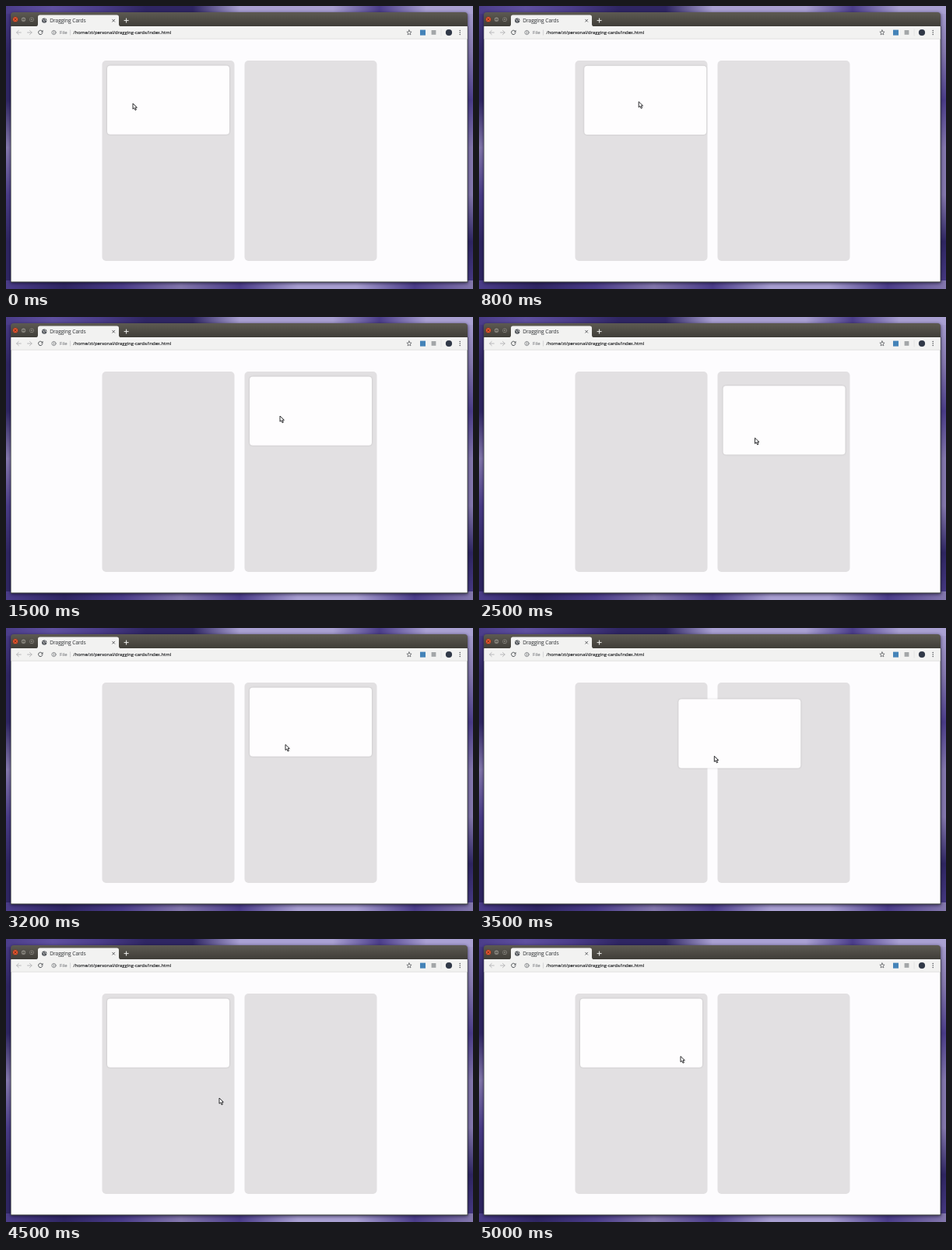
Write an HTML page that moves like this. It is 600 px wide and 363 px high and loops after 5.1 s.

```html
<!DOCTYPE html>
<html lang="en">
<head>
<meta charset="utf-8">
<title>Dragging Cards</title>
<style>
  html, body { margin: 0; width: 100%; height: 100%; overflow: hidden; background: #41357a; }
  svg { display: block; width: 600px; height: 363px; }
  text { font-family: "Open Sans", "Noto Sans", sans-serif; }
  #card { filter: drop-shadow(0 .3px 1px rgba(0, 0, 0, .16)); }
  .window { filter: drop-shadow(0 1px 2px rgba(10, 5, 30, .7)); }
  .line { fill: none; stroke-linecap: round; stroke-linejoin: round; }
</style>
</head>
<body>
<svg viewBox="0 0 600 363">
  <defs id="defs">
    <linearGradient id="bar" x2="0" y2="1">
      <stop offset="0" stop-color="#5d5a52"/>
      <stop offset="1" stop-color="#3e3c37"/>
    </linearGradient>
  </defs>

  <!-- wallpaper -->
  <rect width="10" height="363" fill="url(#left)"/>
  <rect x="590" width="10" height="363" fill="url(#right)"/>
  <rect width="600" height="10" fill="url(#top)"/>
  <rect y="352" width="600" height="11" fill="url(#bottom)"/>

  <!-- browser window -->
  <g class="window">
    <path fill="url(#bar)" d="M6 27V12q0-4 4-4h579q4 0 4 4v15z"/>
    <path fill="#3a403d" d="M6 26h587.4v328.6H6z"/>
  </g>
  <path fill="#fdfcfe" d="M6.6 26h586v327.4h-586z"/>
  <path fill="#f2f2f1" d="M6.6 26.2h586V42h-586zM38 26.3q3 0 3-3V14q0-2.6 2.6-2.6h98.8q2.6 0 2.6 2.6v9.3q0 3 3 3z"/>
  <path fill="#d8d7d7" d="M6.6 41.8h586v.6h-586z"/>

  <circle cx="12" cy="17.2" r="3.6" fill="#e4552f" stroke="#35332f" stroke-width=".6"/>
  <path class="line" stroke="#6b2512" stroke-width=".8" d="M10.7 15.9l2.6 2.6m0-2.6l-2.6 2.6"/>
  <g fill="#85827a" stroke="#35332f" stroke-width=".6">
    <circle cx="22.5" cy="17.2" r="3.4"/>
    <circle cx="33" cy="17.2" r="3.4"/>
  </g>
  <path class="line" stroke="#3b3934" stroke-width=".8" d="M21 17.2h3M31.7 15.9h2.6v2.6h-2.6z"/>

  <circle cx="49.2" cy="18.6" r="3.2" fill="#50545a"/>
  <path class="line" stroke="#f2f2f1" stroke-width=".7" d="M47 17.4l1.8.9.2 1.8M50.3 16.2l-.2 1.4 1.7 1"/>
  <text x="56.2" y="20.9" font-size="6.55" fill="#494b4e" stroke="#494b4e" stroke-width=".1">Dragging Cards</text>
  <path class="line" stroke="#55575a" stroke-width=".9" d="M136.7 17.2l3 3m0-3l-3 3"/>
  <path class="line" stroke="#eeeeec" stroke-width="1" d="M152 18.6h5.2M154.6 16v5.2"/>

  <!-- toolbar -->
  <g class="line" stroke="#b3b3b5" stroke-width=".9">
    <path d="M19.3 34h-5.6m2.6-2.6L13.6 34l2.7 2.6"/>
    <path d="M27.5 34h5.6m-2.6-2.6l2.7 2.6-2.7 2.6"/>
  </g>
  <path class="line" stroke="#505357" stroke-width="1" d="M46.5 32.3a2.7 2.7 0 1 0 .4 2.3"/>
  <path fill="#505357" d="M47.5 30.7v2.7h-2.7z"/>
  <circle class="line" cx="61.5" cy="34" r="2.6" stroke="#5f6368" stroke-width=".7"/>
  <path fill="#5f6368" d="M61.1 33.6h.8v1.9h-.8zM61.1 32.3h.8v.8h-.8z"/>
  <text x="69" y="36.3" font-size="6.1" fill="#5c5f64">File</text>
  <path fill="#c3c4c6" d="M82.4 30.6h.6v6.8h-.6z"/>
  <text x="86.6" y="36.3" font-size="5.9" fill="#1d1e21" stroke="#1d1e21" stroke-width=".15">/home/zt/personal/dragging-cards/index.html</text>
  <path class="line" stroke="#4c4f54" stroke-width=".7" d="M518 30.9l.9 2.1 2.2.2-1.7 1.5.5 2.2-1.9-1.2-1.9 1.2.5-2.2-1.7-1.5 2.2-.2z"/>
  <path fill="#4483b8" d="M532 30.6h7v7h-7z"/>
  <path fill="#a3a6a8" d="M546.6 31h5.8v5.8h-5.8z"/>
  <path fill="#d2d2d3" d="M558.8 29.5h.5v9h-.5z"/>
  <circle cx="569" cy="34" r="4.1" fill="#303847"/>
  <path class="line" stroke="#4c4f54" stroke-width="1.5" stroke-dasharray="0 2.5" d="M583.2 31.5v5.1"/>

  <!-- board -->
  <rect x="123.5" y="70" width="170" height="257" rx="5" fill="#e2e0e2"/>
  <rect x="306.5" y="70" width="170" height="257" rx="5" fill="#e2e0e2"/>
  <rect id="card" width="157" height="88.3" rx="4" fill="#fefdfe"/>
  <path id="cursor" fill="#fff" stroke="#17171a" stroke-width=".9" stroke-linejoin="round"
        d="M0 0v7.2l1.7-1.5 1.3 2.9 1.4-.6-1.3-2.8h2.3z"/>
</svg>
<script>
  const LOOP = 5100, STEP = 100;
  const LEFT = { x: 130, y: 76.5 }, RIGHT = { x: 313, y: 76.5 };
  const byId = id => document.getElementById(id);

  // Wallpaper edges: soft tones at even distances
  function gradient(id, vertical, colors) {
    const stops = colors.map((color, i) =>
      `<stop offset="${i / (colors.length - 1)}" stop-color="${color}"/>`).join("");
    const axis = vertical ? 'x2="0" y2="1"' : "";
    byId("defs").innerHTML += `<linearGradient id="${id}" ${axis}>${stops}</linearGradient>`;
  }
  const night = "#2f2663", plum = "#4b3d8a", mist = "#8478ad", lilac = "#a9a0d2";
  gradient("top", false, [plum, "#5f50a0", plum, night, night, lilac, lilac, lilac, plum, lilac, lilac]);
  gradient("bottom", false, [plum, night, plum, mist, plum, lilac, lilac, plum, mist]);
  gradient("left", true, [plum, night, night, mist, plum, night, night]);
  gradient("right", true, [lilac, mist, plum, mist, mist, night, plum]);

  // Resting points of the hand: time, x, y
  const stops = [
    [0, 163, 125], [500, 200, 122.5], [750, 200, 122.5], [1200, 352, 130],
    [1500, 352, 127], [1900, 353, 137], [2400, 353, 137], [2700, 359, 207],
    [3200, 359, 149.5], [3280, 359, 149.5], [3800, 212, 188], [3900, 212, 188],
    [4100, 213, 158.5], [4400, 274, 204], [4500, 274, 204], [5000, 259, 150.5]
  ];

  // While held, the card keeps the grip point (dx, dy) under the cursor
  const drags = [
    { start: 600, end: 1300, dx: 70, dy: 46, drop: RIGHT },
    { start: 2500, end: 2900, dx: 41, dy: 67, drop: RIGHT },
    { start: 3200, end: 3800, dx: 46, dy: 73, drop: LEFT },
    { start: 4100, end: 4500, dx: 83, dy: 82, drop: LEFT }
  ];

  const ease = k => k * k * (3 - 2 * k);

  function cursorAt(t) {
    const next = stops.findIndex(([time]) => time > t);
    if (next < 0) return { x: stops.at(-1)[1], y: stops.at(-1)[2] };
    const [t0, x0, y0] = stops[next - 1], [t1, x1, y1] = stops[next];
    const k = ease((t - t0) / (t1 - t0));
    return { x: x0 + (x1 - x0) * k, y: y0 + (y1 - y0) * k };
  }

  function cardAt(t, hand) {
    const last = drags.filter(drag => drag.start <= t).pop();
    if (!last) return LEFT;
    return t < last.end ? { x: hand.x - last.dx, y: hand.y - last.dy } : last.drop;
  }

  const move = (el, { x, y }) => el.setAttribute("transform", `translate(${x} ${y})`);
  const card = byId("card"), cursor = byId("cursor");
  const start = performance.now();

  function draw() {
    const elapsed = Math.max(0, performance.now() - start) % LOOP;
    const t = Math.floor(elapsed / STEP) * STEP;
    const hand = cursorAt(t);
    move(cursor, hand);
    move(card, cardAt(t, hand));
    requestAnimationFrame(draw);
  }
  draw();
</script>
</body>
</html>
```
